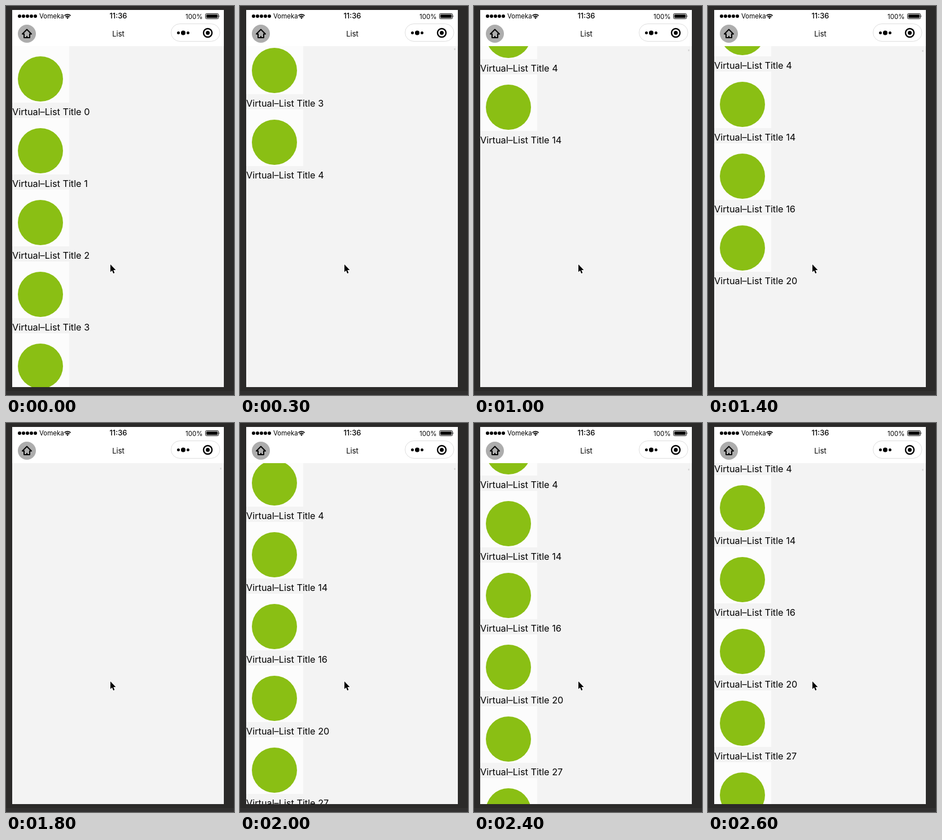
An HTML page for the animation above (2.7 s loop, 404x688 px).

```html
<!DOCTYPE html>
<html lang="en">
<head>
<meta charset="utf-8">
<title>Virtual list</title>
<style>
  html, body { margin: 0; width: 100%; height: 100%; overflow: hidden; background: #2b2a29; }
  svg { display: block; font-family: Inter, "Liberation Sans", sans-serif; }
  .line { fill: none; stroke: #000; }
</style>
</head>
<body>
<svg width="404" height="688" viewBox="0 0 404 688">
  <rect width="404" height="688" fill="#2b2a29"/>
  <rect y="681" width="404" height="7" fill="#313030"/>
  <rect x="11" y="7" width="375" height="667" fill="#f3f3f3"/>
  <svg x="11" y="71" width="375" height="603">
    <g id="list"></g>
    <rect id="thumb" x="368.5" width="2" height="3" fill="#d2d2d2"/>
  </svg>

  <rect x="11" y="7" width="375" height="64" fill="#fff"/>
  <path d="M24 18h28.1" class="line" stroke-width="6" stroke-linecap="round" stroke-dasharray="0 7"/>
  <text x="59" y="22" font-size="11.5">Vomeka</text>
  <path d="M103.5 17.2a7.8 7.8 0 0 1 11 0M105.6 19.4a4.8 4.8 0 0 1 6.8 0" class="line" stroke-width="1.8"/>
  <path d="M109 23l-2-2.2a2.8 2.8 0 0 1 4 0z"/>
  <text x="199" y="22" font-size="13" font-weight="500" text-anchor="middle">11:36</text>
  <text x="348.5" y="22.5" font-size="11.5" text-anchor="end">100%</text>
  <rect x="353.5" y="13.5" width="23" height="9" rx="2" class="line"/>
  <rect x="355" y="15" width="20" height="6" rx="1"/>
  <path d="M377.5 16q1.6 2 0 4z"/>

  <circle cx="37" cy="49" r="16" fill="#adadad"/>
  <path d="M37 41.5l8 8h-3V56H32v-6.5h-3zM37 56v-3" class="line" stroke-width="2" stroke-linejoin="round"/>
  <text x="199" y="54" font-size="13" text-anchor="middle">List</text>
  <rect x="292.5" y="31.5" width="86.5" height="31" rx="15.5" fill="#fff" stroke="#dedede"/>
  <circle cx="305.5" cy="47.5" r="2.5"/>
  <circle cx="314" cy="47.5" r="4"/>
  <circle cx="322.5" cy="47.5" r="2.5"/>
  <circle cx="357.5" cy="47.5" r="7.5" class="line" stroke-width="2.4"/>
  <circle cx="357.5" cy="47.5" r="3.5"/>

  <path d="M185 457v13.5l3-2.7 2.2 5.2 2.2-1-2.2-5h4.3z" stroke="#fff" paint-order="stroke" stroke-width="1.6"/>
</svg>
<script>
  const LOOP = 2700, STEP = 100, ROW = 127;
  const FLING_END = 400, REFILL = 900, BLANK = 1600, DRIFT = 2000;
  const firstRows = [0, 1, 2, 3, 4];
  const earlyRows = [7, 12];
  const lateRows = [14, 16, 20, 27, 33];
  const list = document.getElementById('list');
  const thumb = document.getElementById('thumb');

  const row = (id, i) => `<g transform="translate(0 ${i * ROW})">
    <rect width="101" height="100" fill="#fcfcfc"/>
    <circle cx="50" cy="58" r="40" fill="#8abf14"/>
    <text y="122" font-size="16.3">Virtual–List Title ${id}</text></g>`;

  // A fast fling outruns the list, which refills row by row, blanks, then drifts on.
  function visibleIds(t) {
    if (t < FLING_END) return firstRows;
    if (t < REFILL) return [4, ...earlyRows.slice(0, Math.ceil((t - 300) / 200))];
    if (t < BLANK) return [4, ...lateRows.slice(0, Math.ceil((t - 800) / 200))];
    return t < DRIFT ? [] : [4, ...lateRows];
  }

  function listTop(t) {
    if (t < FLING_END) return -1.32 * t;
    return t < DRIFT ? -66 - t / 87.5 : -51 - 0.1375 * (t - 2200);
  }

  function draw() {
    const t = Math.floor(performance.now() % LOOP / STEP) * STEP;
    list.setAttribute('transform', `translate(0 ${Math.round(listTop(t))})`);
    list.innerHTML = visibleIds(t).map(row).join('');
    thumb.setAttribute('y', 3 + t / 350);
    thumb.style.opacity = t ? 1 : 0;
    requestAnimationFrame(draw);
  }
  draw();
</script>
</body>
</html>
```
